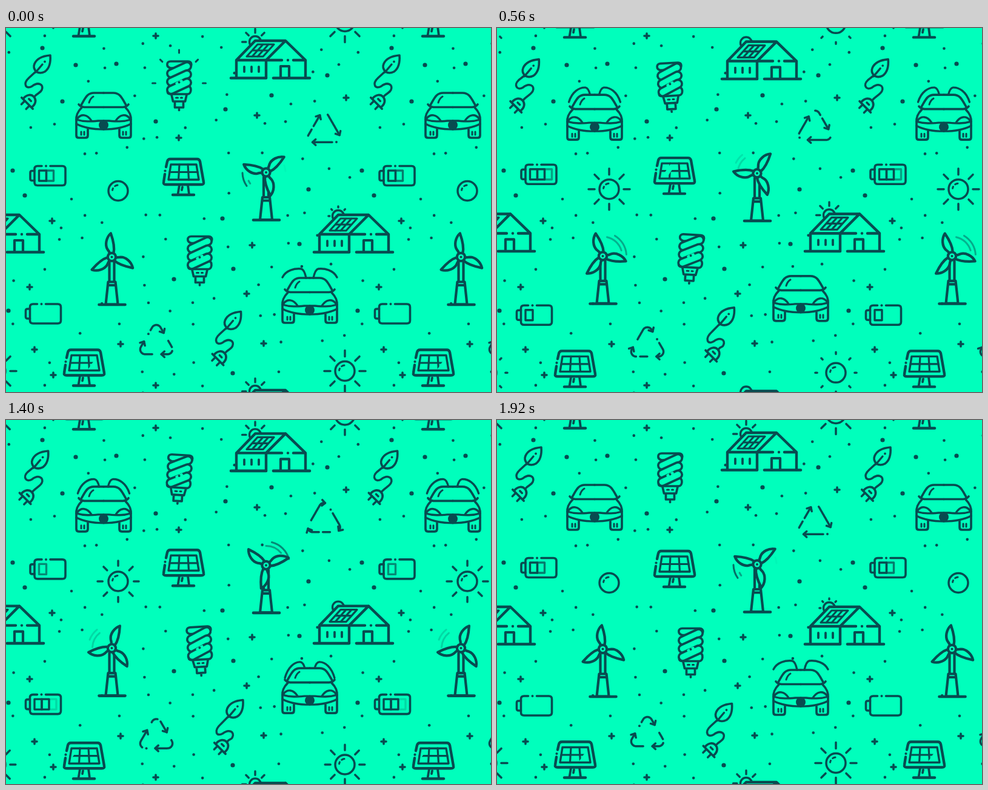
Animation, 800 px wide and 600 px high, one loop 1960 ms. Source, as an HTML page with a canvas:

```html
<!DOCTYPE html>
<html lang="en">
<head>
<meta charset="utf-8">
<title>Green energy pattern</title>
<style>
html, body { margin: 0; width: 100%; height: 100%; overflow: hidden; background: #00ffbc; }
canvas { display: block; width: 800px; height: 600px; }
</style>
</head>
<body>
<canvas id="stage" width="800" height="600"></canvas>
<script>
const ctx = document.getElementById('stage').getContext('2d');
const BG = '#00ffbc', INK = '#084b50';
const TILE = 576, CYCLE = 1920, HALF = CYCLE / 2, LOOP = 1960, STEP = 40;
const TAU = Math.PI * 2, DEG = Math.PI / 180;

const lerp = (a, b, k) => a + (b - a) * k;
const mod = (a, n) => ((a % n) + n) % n;
const ramp = (t, from, to) => Math.min(1, Math.max(0, (t - from) / (to - from)));

function at(x, y, draw) {
  ctx.save();
  ctx.translate(x, y);
  draw();
  ctx.restore();
}

function line(d, width, fill) {
  const p = new Path2D(d);
  if (fill) { ctx.fillStyle = fill; ctx.fill(p); }
  if (width) ctx.lineWidth = width;
  ctx.stroke(p);
}

function both(draw) {
  draw();
  ctx.save();
  ctx.scale(-1, 1);
  draw();
  ctx.restore();
}

function dot(x, y, r, color = INK) {
  ctx.fillStyle = color;
  ctx.beginPath();
  ctx.arc(x, y, r, 0, TAU);
  ctx.fill();
}

function arc(r, from, to) {
  ctx.beginPath();
  ctx.arc(0, 0, r, from * DEG, to * DEG);
  ctx.stroke();
}

// A ray from radius inn to out around (x, y).
function ray(angle, inn, out, x = 0, y = 0) {
  const c = Math.cos(angle * DEG), s = Math.sin(angle * DEG);
  ctx.beginPath();
  ctx.moveTo(x + c * inn, y + s * inn);
  ctx.lineTo(x + c * out + 0.01, y + s * out);
  ctx.stroke();
}

// Rays of a sun grow out, hold, shrink to dots and vanish.
function rays(t, scale, from, to) {
  t = mod(t, CYCLE);
  if (t < 80 || t > 1590) return;
  const grow = ramp(t, 80, 480);
  const out = scale * (22 + 12 * grow);
  const inn = scale * (22 + 2 * grow + 10 * ramp(t, 1360, 1590));
  for (let a = from; a <= to; a += 45) ray(a, inn, out);
}

function sun(t) {
  ctx.lineWidth = 3.5;
  arc(16, 0, 360);
  rays(t, 1, 0, 315);
  ctx.lineWidth = 3;
  arc(9.5, 188, 206);
  arc(9.5, 236, 264);
}

function door(open) {
  const lift = Math.sqrt(open);
  line(`M${-32 - 13 * lift},${21 - 22 * open * open}` +
    `C${-30 - 9 * lift},${8 - 21 * open} -25,${1 - 17 * lift} ${-17 + 3 * open},${-15 * lift}` +
    `Q${-12 + 3 * open},${-14 * lift} ${-10 + 4 * open},0`, 3.4);
}

function car(open) {
  ctx.translate(0, -37);
  both(() => {
    if (open > 0.02) door(open);
    line('M0,0H-16C-27,0 -30,8 -37,20', 3.7);
    line('M0,23.5H-32Q-38,23 -41,19');
    line('M-36,24C-43,31 -46,37 -45,46V70Q-45,74 -41,74H-30Q-26,74 -26,70V60');
    line('M-43,42C-37,34 -27,35 -20,46', 3.4);
    line('M-45,44C-32,48 -20,47 -9,46H0');
    line('M-45,51C-32,58 -14,60 0,60');
    line('M-37,64V69M-32,64V69', 3);
  });
  line('M-24,16Q-22,9 -17,6', 3);
  dot(0, 53, 8);
}

// Cells fill one after another, then drain together.
function battery(t) {
  t = mod(t, CYCLE);
  const level = ramp(t, 260, 540) + ramp(t, 740, 1040) + ramp(t, 1320, 1700) - 3 * ramp(t, 1740, 1900);
  ctx.translate(-69, 0);
  line('M73,-16H93Q98,-16 98,-11V11Q98,16 93,16H52Q47,16 47,11V-11Q47,-16 52,-16H59', 3.6);
  line('M47,-8H43Q40,-8 40,-5V5Q40,8 43,8H47');
  dot(66, -16, 2);
  for (let i = 2; i >= 0; i--) {
    ctx.globalAlpha = ramp(level, i, i + 1);
    line(`M${54.5 + i * 12},-8.5h12v17h-12z`, 3.4);
  }
  ctx.globalAlpha = 1;
}

function solar(t) {
  ctx.translate(0, -30);
  line('M-31,25L-33,38Q-34,42 -29,42H29Q34,42 33,38L27,4Q26,0 22,0H-22Q-26,0 -27,4L-29,13', 4.4);
  dot(-30.5, 19.5, 2.1);
  line('M-23,21.5H23M-7,9L-8.5,34M7,9L8.5,34', 3.2);
  // A slanted glint crosses the cells from left to right.
  const x = -10 + (mod(t, CYCLE) - 560) * 25 / 320;
  ctx.save();
  ctx.clip(new Path2D('M-21,9H21L25,34H-25z'));
  ctx.fillStyle = BG;
  ctx.fill(new Path2D(`M${x + 4},9h9l-17,25h-9z`));
  ctx.restore();
  line('M-21,9H21L25,34H-25z', 3.4);
  line('M-7,43L-9.5,58M7,43L9,58M-2,46L-3,51', 3.8);
  line('M-18,59H17', 4.4);
}

function house(t) {
  ctx.translate(-436, -52);
  at(411, 23, () => {
    ctx.lineWidth = 3.4;
    arc(9.5, 0, 360);
    rays(t, 0.63, 180, 315);
  });
  line('M411,21H461L494,53V82H380V53Z', 0.1, BG);
  line('M380,82V53L411,21H461L494,53V82M461,21L429,53V82M380,53H455M474,53H493', 4.4);
  dot(465, 53, 2.2);
  line('M453,82V63H467V82', 4.2);
  line('M371,82.5H429M441,82.5H501', 4.6);
  line('M393,64V72M405,64V72M417,64V72', 3.8);
  line('M415,27H442L424,47H397ZM406,37H433M424,27L406,47M433,27L415,47', 3.2);
}

// Two arcs trail a blade: the head follows it, the tail catches up as they fade.
function swoosh(t, start, from) {
  for (const [r, delay, strength] of [[39, 0, 0.8], [32, 130, 0.5]]) {
    const age = mod(t - start, CYCLE) - delay;
    const lead = from + 0.1875 * Math.min(age, 460);
    const tail = from + 0.14 * Math.max(0, age - 300);
    if (age <= 0 || age > 840 || tail >= lead) continue;
    ctx.globalAlpha = strength * (1 - ramp(age, 300, 840));
    ctx.lineWidth = 3;
    arc(r, tail, lead);
    ctx.globalAlpha = 1;
  }
}

function turbine(t, angle, left, right) {
  ctx.translate(0, -20);
  line('M-4,8V40M4,8V40', 4.2);
  line('M-6,41H6L10,78H-10ZM-6,46.5H6');
  line('M-21,78.5H22', 4.6);
  swoosh(t, left, 145);
  swoosh(t, right, 270);
  for (let i = 0; i < 3; i++) {
    ctx.save();
    ctx.rotate((angle + 120 * i + t * 360 / CYCLE) * DEG);
    line('M6,3C14,5 27,3 39,-1C32,-9 20,-11 13,-7Q9,-4 6,-3Z', 4.3, BG);
    ctx.restore();
  }
  dot(0, 0, 8.7);
  dot(0, 0, 4.5, BG);
  dot(0, 0, 2);
}

// Point on a rounded triangle; whole numbers are the corners, clockwise from the top.
function trianglePoint(d) {
  const r = 8, bend = r * Math.PI / 3, straight = 37, side = straight + 2 * bend;
  const n = Math.floor(d), s = (d - n) * side, reach = 37.5 - 2 * r;
  const turn = k => [r * Math.sin(k), -reach - r * Math.cos(k)];
  const spin = ([x, y], a) => [x * Math.cos(a) - y * Math.sin(a), x * Math.sin(a) + y * Math.cos(a)];
  let p;
  if (s < bend) p = turn(s / r);
  else if (s < bend + straight) {
    const [x, y] = turn(Math.PI / 3), run = s - bend;
    p = [x + run * Math.cos(Math.PI / 3), y + run * Math.sin(Math.PI / 3)];
  } else p = spin(turn((s - side) / r), TAU / 3);
  return spin(p, n * TAU / 3);
}

function track(from, to) {
  ctx.beginPath();
  for (let i = 0; i <= 20; i++) ctx.lineTo(...trianglePoint(lerp(from, to, i / 20)));
  ctx.stroke();
}

// Three arrows chase each other: one with a dot behind, one split, one whole.
function recycle(t, start) {
  ctx.lineWidth = 3.5;
  for (let i = 0; i < 3; i++) {
    const h = start + t / 640 + i;
    if (i === 0) dot(...trianglePoint(h - 0.73), 2);
    if (i === 1) track(h - 0.72, h - 0.5);
    track(h - [0.6, 0.38, 0.72][i], h);
    const [x, y] = trianglePoint(h), [px, py] = trianglePoint(h - 0.05);
    const a = Math.atan2(y - py, x - px);
    const arm = k => `${x + 7 * Math.cos(a + k)},${y + 7 * Math.sin(a + k)}`;
    line(`M${arm(2.4)}L${x},${y}L${arm(-2.4)}`);
  }
}

function glow(age) {
  if (age < 0 || age > 480) return;
  const k = age / 480, out = 4 + 6 * k, inn = out - 5 * (1 - k * k);
  ctx.lineWidth = 3;
  for (let a = 180; a <= 360; a += 45) {
    const s = -Math.sin(a * DEG);
    ray(a, inn, out, 40 * Math.cos(a * DEG), -51 * s);
  }
}

function bulb(age, tilt) {
  glow(age);
  ctx.rotate(tilt * DEG);
  line('M-14,-25C-22,-27 -21,-36 -14,-36H15C22,-36 22,-27 15,-25Z', 3.7, BG);
  line('M15,4C22,7 20,18 14,18H-13C-21,18 -21,11 -14,8Z', 3.7, BG);
  for (const y of [-22, -8.5, 5]) {
    for (const [color, width] of [[INK, 17], [BG, 9.6]]) {
      ctx.strokeStyle = color;
      line(`M-13,${y + 6}L13,${y - 6}`, width);
    }
  }
  ctx.strokeStyle = BG;
  line('M-4,.4L4,-3.4', 4.4);
  ctx.strokeStyle = INK;
  dot(0, -1.5, 2);
  line('M-12.5,19L-10,30H10L12.5,19M-7,31V40H7V31M0,43V44.5', 3.7);
  line('M-5,24H-2M3,24H5', 3);
}

// s slides the leaf and the plug along their axis while the cord gives way.
function plant(s) {
  ctx.translate(-49, -90);
  const x = -6 * s, ly = 10.5 * s, py = 9.5 * s, my = 3 * s;
  line(`M${50 + x},${71 + ly}L${38 + x * 0.6},${82 + ly * 0.6}C27,${92 + my} 33,${102 + my} 43,${96 + my}` +
    `C53,${88 + my} 63,${93 + my} 59,${102 + my}C57,${107 + my} ${52 + x},${107 + py} ${47 + x},${113 + py}`, 3.5);
  at(x, ly, () => {
    line('M73,45C74,58 71,67 64,72Q56,76 50,72Q44,66 47,59C51,50 61,46 73,45Z', 3.6);
    line('M49,73L60,60', 3.4);
    dot(64, 55.5, 1.9);
  });
  at(35 + x, 124 + py, () => {
    ctx.rotate(135 * DEG);
    line('M0,-13V13M-1,10C-20,12 -20,-12 -1,-10', 3.7);
    line('M1,-5.5H8M1,5.5H8M-7,-2V3', 3.5);
  });
}

// Resting place, vertical sway in px, painter(t, c, w): c swings 0 to 1, w -1 to 1.
const icons = [
  [161, 144, 5, t => car(ramp(t, 200, 760) - ramp(t, 1240, 1720))],
  [501, 449, -5, t => car(1 - ramp(t, 120, 480) + ramp(t, 1080, 1760))],
  [69, 243.5, 0, (t, c, w) => at(0, -2.4 * w, () => battery(t + HALF))],
  [61.5, 471, 0, (t, c, w) => at(0, 2.4 * w, () => battery(t))],
  [185, 268.5, -4.5, t => sun(t)],
  [559, 565.5, 4.5, t => sun(t + HALF)],
  [293, 246, -3, t => solar(t)],
  [129, 560.5, 3, t => solar(t - 1000)],
  [436, 52, 2.5, t => house(t + 1160)],
  [573, 339, -2.5, t => house(t + 200)],
  [429, 258, 2.5, t => turbine(t, 81, -180, 1000)],
  [174.5, 397.5, -2.5, t => turbine(t, 29, 700, 40)],
  [524.5, 169.5, -6, t => recycle(t, 1.85)],
  [248, 519, 6, t => recycle(t, 0.35)],
  [285.5, 91, 4.5, (t, c, w) => bulb(t, -3.5 * w)],
  [319.5, 379.5, -4.5, (t, c, w) => bulb(t - 840, 3.5 * w)],
  [49, 90, 0, (t, c) => plant(c)],
  [363.5, 512.5, 0, (t, c) => plant(-c)],
];

const pluses = [[247,13],[414,144],[285,181],[561,115],[76,318],[406,358],[39,427],[397,438],[425,520],[189,521],[47,530],[78,572]];
const bigDots = [[60,33],[115,61],[182,59],[93,121],[247,154],[362,134],[438,111],[530,78],[11,235],[31,276],[357,314],[499,266],[484,356],[277,414],[375,397],[4,466],[374,569]];
const smallDots = scatter(12, 7);

// Jittered grid of points that keeps clear of everything else, across tile edges too.
function scatter(cells, seed) {
  const random = () => (seed = seed * 16807 % 2147483647) / 2147483647;
  const gap = (a, b) => { const d = mod(a - b, TILE); return Math.min(d, TILE - d); };
  const clear = (x, y, spots, r) => spots.every(([u, v]) => Math.hypot(gap(x, u), gap(y, v)) > r);
  const points = [];
  for (let i = 0; i < cells * cells; i++) {
    const x = (i % cells + 0.1 + 0.8 * random()) * TILE / cells;
    const y = (Math.floor(i / cells) + 0.1 + 0.8 * random()) * TILE / cells;
    if (clear(x, y, icons, 50) && clear(x, y, [...pluses, ...bigDots, ...points], 18)) points.push([x, y]);
  }
  return points;
}

function scene(t) {
  for (const [x, y] of pluses) line(`M${x - 4},${y}h8M${x},${y - 4}v8`, 3.6);
  for (const [x, y] of bigDots) dot(x, y, 3.6);
  for (const [x, y] of smallDots) dot(x, y, 2.3);
  const a = t * TAU / CYCLE, c = (1 - Math.cos(a)) / 2, w = Math.sin(a);
  for (const [x, y, sway, paint] of icons) at(x, y + sway * c, () => paint(t, c, w));
}

function frame() {
  const t = Math.floor((performance.now() % LOOP) / STEP) * STEP;
  ctx.fillStyle = BG;
  ctx.fillRect(0, 0, 800, 600);
  ctx.lineCap = ctx.lineJoin = 'round';
  ctx.strokeStyle = INK;
  for (const x of [-TILE, 0, TILE])
    for (const y of [-TILE, 0, TILE]) at(x, y, () => scene(t));
  requestAnimationFrame(frame);
}
frame();
</script>
</body>
</html>
```
